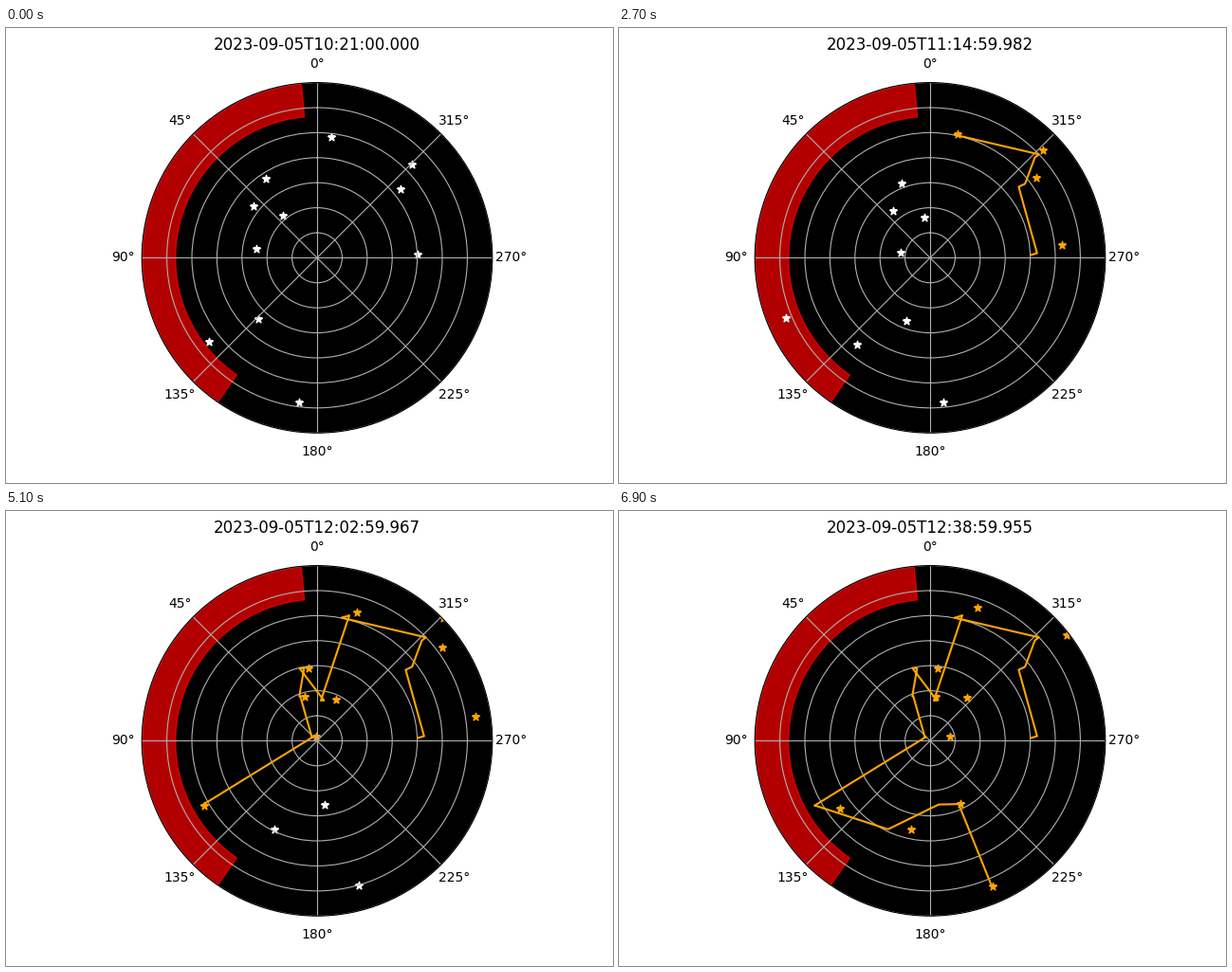
A matplotlib script that plays this animation: 640 px wide and 480 px high, repeating every 7 s.

```python
import numpy as np
import matplotlib.pyplot as plt
from matplotlib.animation import FuncAnimation

FRAMES = 70
INTERVAL = 100                 # ms
STEP_MS = 119999.35            # observing time per frame
START_MS = (10 * 60 + 21) * 60000
LATITUDE = np.radians(19.826)
TURN = 0.50137                 # sky rotation per frame, degrees

# One key point per star, in visiting order; all motion follows from these
DEC = np.array([16.03, 41.08, 47.0, 67.75, 35.9, 48.58,
                37.4, 21.37, -9.4, -15.83, -5.66, -38.15])
HOUR = np.array([42.15, 44.4, 56.78, 13.0, -16.45, -30.35,
                 -31.88, -26.08, -69.45, -42.1, -22.75, -7.85])
VISIT = np.array([0, 6, 14, 20.5, 36.5, 40, 46, 47.5, 49, 51, 52, 68])


def sky_position(dec, hour):
    """Azimuth in radians and zenith distance in degrees."""
    dec, hour = np.radians(dec), np.radians(hour)
    along = np.cos(dec) * np.cos(hour)
    west = np.cos(dec) * np.sin(hour)
    north = np.sin(dec) * np.cos(LATITUDE) - along * np.sin(LATITUDE)
    up = np.sin(dec) * np.sin(LATITUDE) + along * np.cos(LATITUDE)
    return np.arctan2(-west, north), np.degrees(np.arccos(up))


def timestamp(frame):
    total = START_MS + round(frame * STEP_MS)
    minutes, ms = divmod(total, 60000)
    hours, minutes = divmod(minutes, 60)
    return f"2023-09-05T{hours:02d}:{minutes:02d}:{ms / 1000:06.3f}"


# The telescope follows whichever star was visited last
samples = np.arange(0, FRAMES, 0.5)
target = np.searchsorted(VISIT, samples, side="right") - 1
path_az, path_zen = sky_position(DEC[target], HOUR[target] + TURN * samples)

fig = plt.figure(figsize=(6.4, 4.8), dpi=100)
ax = fig.add_subplot(projection="polar")
ax.set_facecolor("black")
ax.set_theta_zero_location("N")
blocked = np.radians(np.arange(5.3, 146.2, 1))
ax.fill_between(blocked, 56.7, 70, color="red", alpha=0.7)
ax.set_yticks(np.arange(10, 71, 10))
ax.set_yticklabels([])

waiting = ax.scatter([], [], marker="*", color="white")
visited = ax.scatter([], [], marker="*", color="orange")
track, = ax.plot([], [], color="orange")
title = ax.set_title(timestamp(0))
ax.set_ylim(0, 70)


def update(frame):
    stars = np.column_stack(sky_position(DEC, HOUR + TURN * frame))
    seen = VISIT < frame
    waiting.set_offsets(stars[~seen])
    visited.set_offsets(stars[seen])
    past = samples < frame
    track.set_data(path_az[past], path_zen[past])
    title.set_text(timestamp(frame))
    return waiting, visited, track, title


anim = FuncAnimation(fig, update, frames=FRAMES, interval=INTERVAL,
                     init_func=lambda: update(0), repeat=True, repeat_delay=0)
plt.show()
```
